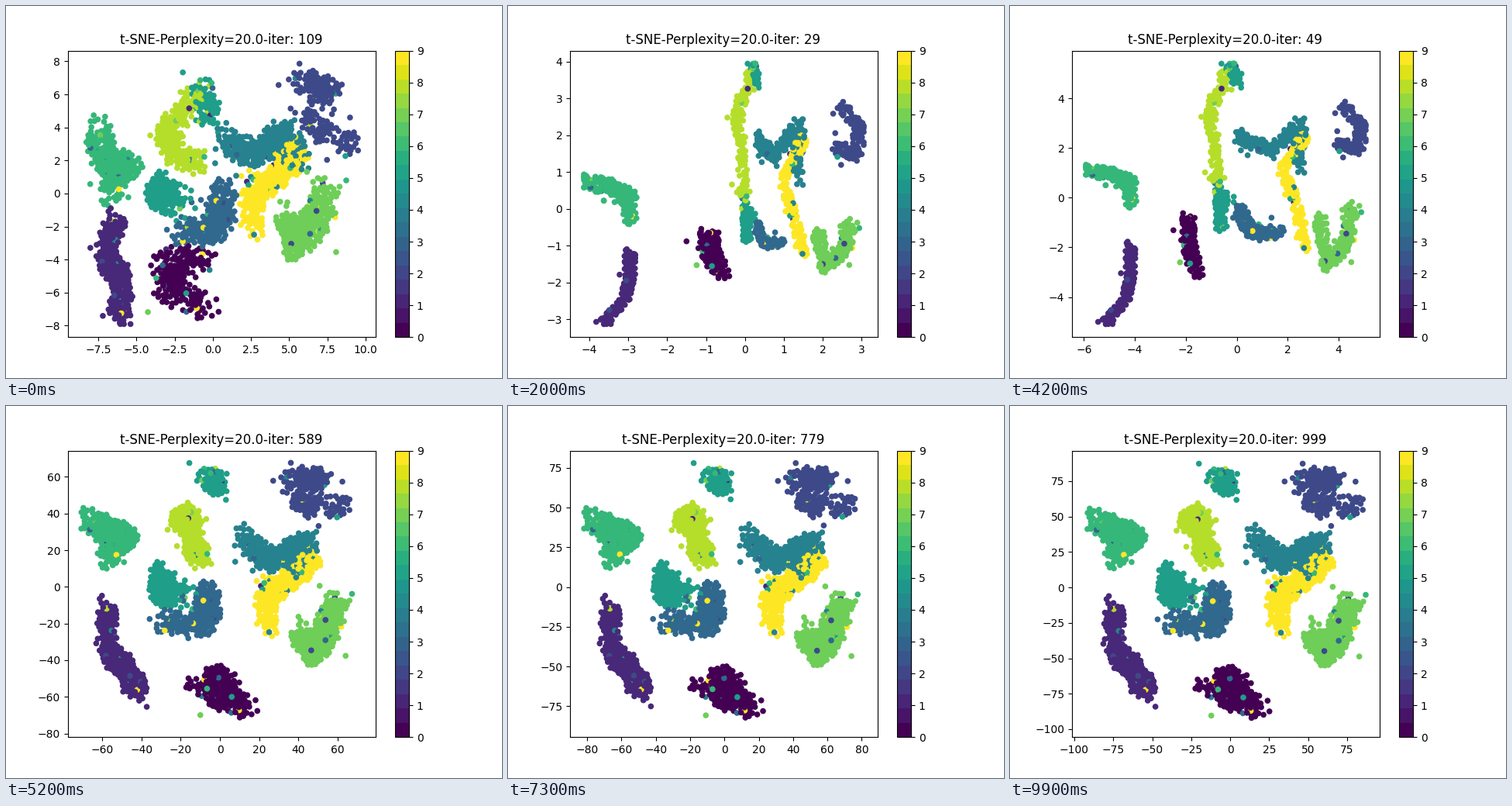
Recreate the animation shown at these times as a matplotlib script. Size 640x480 px, loop 10 s.

```python
import numpy as np
import matplotlib.pyplot as plt
from matplotlib.animation import FuncAnimation
from matplotlib.cm import ScalarMappable
from matplotlib.colors import Normalize

rng = np.random.default_rng(7)
LEFT, TOP, WIDTH, HEIGHT = 80, 57.6, 396.8, 369.6

# Axis limits (x0, x1, y0, y1) at the key iterations
LIMITS = {
    29: (-4.50, 3.41, -3.48, 4.30),
    49: (-6.47, 5.61, -5.61, 5.92),
    109: (-9.48, 10.65, -8.69, 8.65),
    189: (-27.56, 31.23, -30.94, 28.87),
    689: (-84.3, 85.9, -89.0, 80.55),
    999: (-101.5, 95.8, -105.6, 96.5),
}

labels, tracks = [], []


def group(digit, n, width, *spines):
    """Scatter n points round a spine that bends from early to late."""
    s = rng.random(n)
    reach = np.sqrt(rng.random(n)) * np.where(rng.random(n) < 0.06, 2.3, 1)
    offset = width * reach * np.exp(2j * np.pi * rng.random(n))
    tracks.append([np.interp(s, np.linspace(0, 1, len(knots)), knots) + k * offset
                   for knots, k in zip(spines, (0.55, 1.15, 1))])
    wrong = rng.random(n) < 0.04
    labels.append(np.where(wrong, rng.integers(1, 10, n), digit))


# Spines as x + yj in stage pixels, at iterations 49, 109 and 999
group(0, 180, 17, (230+272j, 230+305j, 241+345j),
      (262+325j, 208+330j, 212+370j, 260+388j),
      (254+362j, 290+352j, 285+378j, 322+388j))
group(1, 215, 12, (155+308j, 156+345j, 150+378j, 123+409j),
      (142+270j, 128+320j, 150+355j, 147+402j),
      (133+253j, 136+315j, 160+340j, 178+368j))
group(2, 160, 14, (428+128j, 455+155j, 450+185j, 422+178j),
      (372+95j, 420+105j, 395+155j, 448+180j),
      (370+95j, 418+92j, 390+130j, 450+128j))
group(3, 180, 17, (296+262j, 310+290j, 345+293j),
      (282+235j, 275+285j, 225+292j), (268+238j, 268+280j, 205+278j))
group(4, 215, 16, (295+170j, 340+185j, 375+150j, 372+215j),
      (283+175j, 325+190j, 360+160j, 375+205j),
      (315+172j, 355+200j, 402+175j, 378+215j))
group(5, 60, 13, (283+76j, 293+97j), (250+102j, 262+145j), (262+90j, 283+104j))
group(5, 115, 15, (272+235j, 272+285j),
      (208+225j, 195+245j, 228+262j), (208+208j, 205+245j, 240+245j))
group(6, 210, 15, (97+212j, 130+216j, 155+225j, 155+255j),
      (120+155j, 125+200j, 160+205j, 130+245j),
      (108+145j, 140+165j, 160+168j, 132+198j))
group(7, 220, 17, (442+255j, 435+305j, 408+335j, 398+270j),
      (412+228j, 405+275j, 372+312j, 362+270j),
      (440+248j, 428+285j, 410+320j, 388+295j))
group(8, 180, 14, (278+85j, 258+140j, 265+190j, 268+235j),
      (242+112j, 210+165j, 215+190j, 250+205j),
      (230+145j, 246+148j, 250+180j, 258+200j))
group(9, 200, 14, (382+165j, 352+212j, 372+262j, 380+315j),
      (378+182j, 352+222j, 318+240j, 318+295j),
      (410+194j, 375+228j, 345+245j, 348+292j))

label = np.concatenate(labels)
early, opened, late = (np.concatenate(part) for part in zip(*tracks))
shuffle = rng.permutation(len(label))
label, early, opened, late = (a[shuffle] for a in (label, early, opened, late))


def bulge(v, centre, size):
    return size * np.exp(-((v - centre) / 60) ** 2)


def relax(z, gap, steps=8):
    """Push apart points that sit closer than gap."""
    for _ in range(steps):
        d = z[:, None] - z
        dist = np.abs(d)
        push = np.where(dist < gap, gap - dist, 0) / np.maximum(dist, 0.1)
        z = z + 0.3 * (d * push).sum(1)
    return z


def to_data(z, lim):
    x0, x1, y0, y1 = lim
    x, y = np.clip(z.real, 98, 459), np.clip(z.imag, 74.4, 410.4)
    return np.column_stack([x0 + (x - LEFT) / WIDTH * (x1 - x0),
                            y1 - (y - TOP) / HEIGHT * (y1 - y0)])


def fit(points):
    lo, hi = points.min(0), points.max(0)
    pad = 0.05 * (hi - lo)
    lo, hi = lo - pad, hi + pad
    return lo[0], hi[0], lo[1], hi[1]


stage = {
    29: early + bulge(early.real, 260, 38) + 1j * bulge(early.imag, 250, 22),
    49: early,
    109: relax(opened, 5),
    189: relax((opened + late) / 2 - 12, 5.5),
    999: relax(late, 5),
}
layout = {k: to_data(z, LIMITS[k]) for k, z in stage.items()}
layout[689] = layout[999] / 1.19
layout[99] = 0.6 * layout[49] + 0.4 * layout[109]
LIMITS[99] = 0.6 * np.array(LIMITS[49]) + 0.4 * np.array(LIMITS[109])
for k, shrink, blur in ((9, 0.35, 0.3), (19, 0.65, 0.1)):
    layout[k] = shrink * layout[29] + rng.normal(0, blur, layout[29].shape)
    LIMITS[k] = fit(layout[k])

keys = sorted(layout)
points_at = np.array([layout[k] for k in keys])
limits_at = np.array([LIMITS[k] for k in keys])
log_keys = np.log(keys)

# Iterations play in text order: 109, 119, ... 189, 19, 199, ...
order = sorted(range(9, 1000, 10), key=str)

fig, ax = plt.subplots(figsize=(6.4, 4.8), dpi=100)
dots = ax.scatter(*layout[109].T, s=20, c=label, cmap="viridis", vmin=0, vmax=9)
fig.colorbar(ScalarMappable(Normalize(0, 9), plt.get_cmap("viridis", 20)), ax=ax)
title = ax.set_title("", x=0.4975)


def update(frame):
    it = order[frame]
    pos = np.interp(np.log(it), log_keys, np.arange(len(keys)))
    i = min(int(pos), len(keys) - 2)
    w = pos - i
    dots.set_offsets((1 - w) * points_at[i] + w * points_at[i + 1])
    x0, x1, y0, y1 = (1 - w) * limits_at[i] + w * limits_at[i + 1]
    ax.set_xlim(x0, x1)
    ax.set_ylim(y0, y1)
    title.set_text(f"t-SNE-Perplexity=20.0-iter: {it}")
    return dots, title


anim = FuncAnimation(fig, update, frames=len(order), interval=100,
                     repeat=True, repeat_delay=0, blit=False)
plt.show()
```
